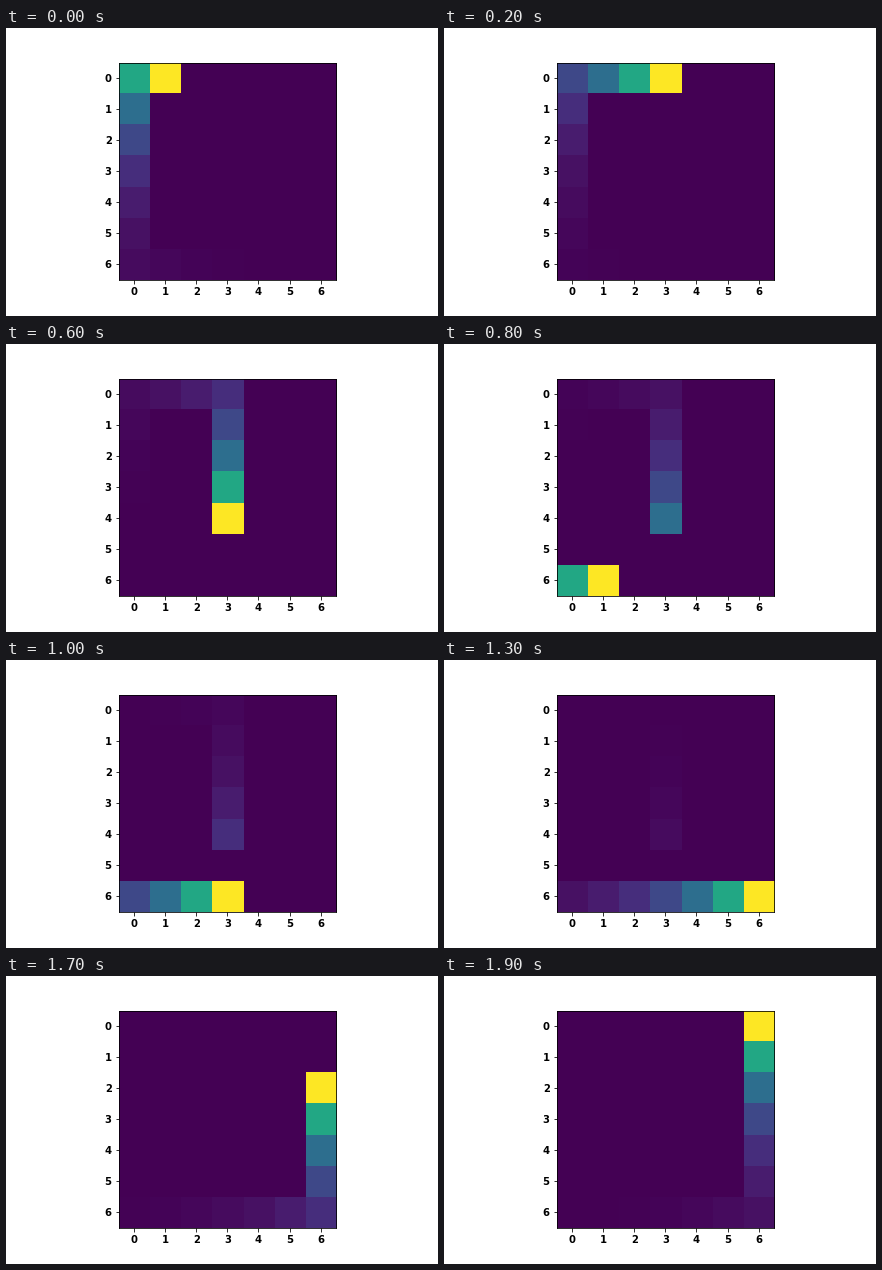
These frames come from a looping animation (432x288 px, 2000 ms). A matplotlib script:

```python
import numpy as np
import matplotlib.pyplot as plt
from matplotlib.animation import FuncAnimation

SIZE = 7
FRAMES = 20
DECAY = 0.6


def line(start, end):
    """Grid cells (row, col) from start to end along a row or column."""
    (r0, c0), (r1, c1) = start, end
    n = max(abs(r1 - r0), abs(c1 - c0)) + 1
    rows = np.linspace(r0, r1, n).round().astype(int)
    cols = np.linspace(c0, c1, n).round().astype(int)
    return list(zip(rows, cols))


# The head walks this path; it jumps once, from (4, 3) to (6, 0).
path = (line((6, 6), (6, 0)) + line((5, 0), (0, 0)) + line((0, 1), (0, 3))
        + line((1, 3), (4, 3)) + line((6, 0), (6, 6)) + line((5, 6), (0, 6)))
lead = len(path) - FRAMES


def trail(frame):
    grid = np.zeros((SIZE, SIZE))
    for cell in path[:lead + frame + 1]:
        grid *= DECAY
        grid[cell] = 1
    return grid


plt.rcParams.update({"font.family": "DejaVu Sans", "font.size": 10,
                     "font.weight": "bold"})
fig = plt.figure(figsize=(6, 4), dpi=72, facecolor="white")
ax = fig.add_subplot()
fig.subplots_adjust(left=0.125, right=0.9, bottom=0.125, top=0.88)
image = ax.imshow(trail(0), cmap="viridis", vmin=0, vmax=1,
                  interpolation="nearest")
ax.set_xticks(range(SIZE))
ax.set_yticks(range(SIZE))


def update(frame):
    image.set_data(trail(frame))
    return [image]


anim = FuncAnimation(fig, update, frames=FRAMES, interval=100,
                     repeat=True, repeat_delay=0)
plt.show()
```
